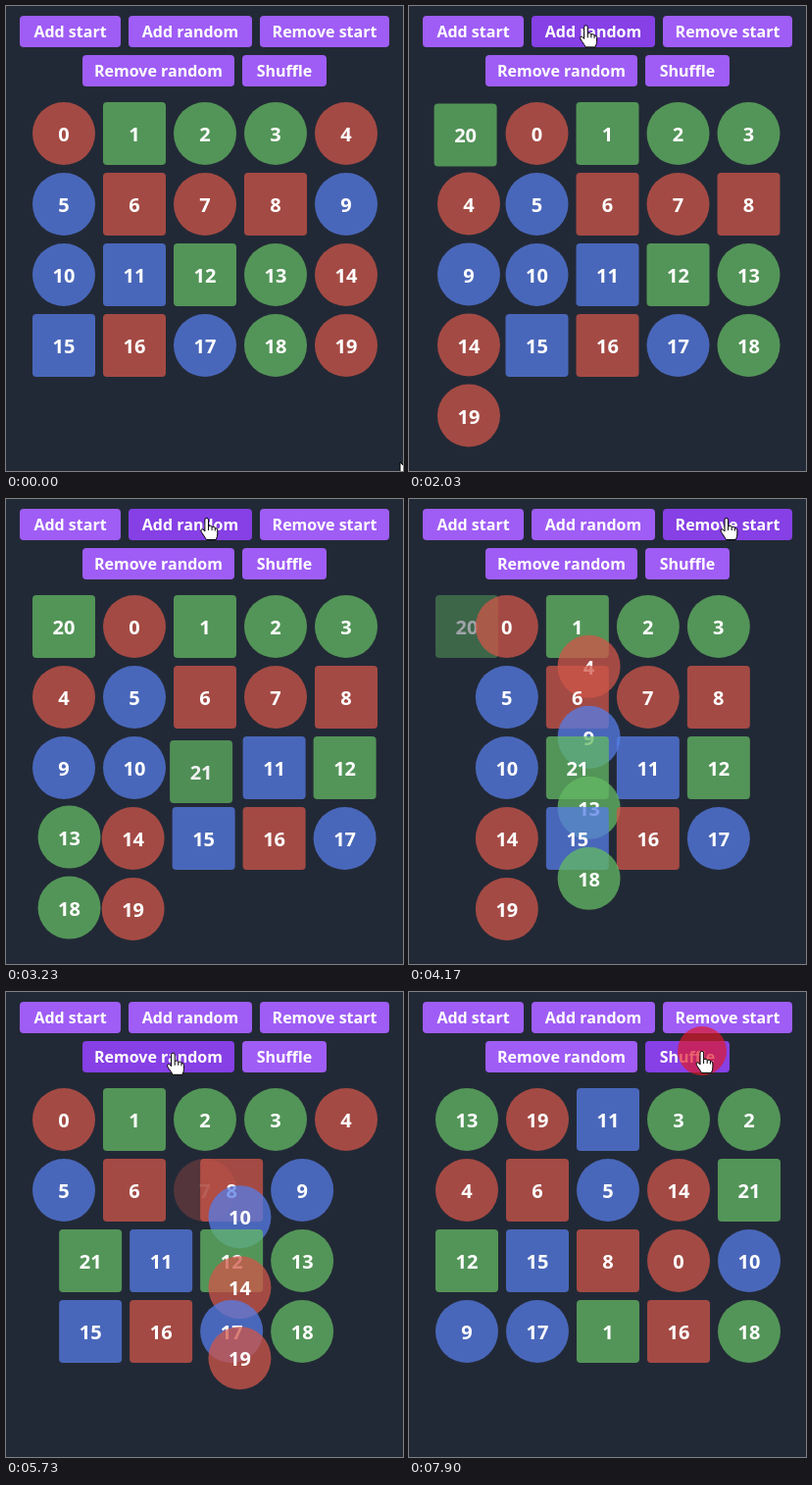
An HTML page that plays this animation: 405x474 px, repeating every 8000 ms.

```html
<!DOCTYPE html>
<html lang="en">
<head>
<meta charset="utf-8">
<title>List transitions</title>
<style>
  html, body { margin: 0; width: 100%; height: 100%; overflow: hidden; background: #222936; }
  body { position: relative; color: #fff; font: 600 16px "Noto Sans", "Open Sans", sans-serif; cursor: none; }
  .button, .item, #ripple, #cursor { position: absolute; left: 0; top: 0; }
  .button, .item { display: flex; align-items: center; justify-content: center; border-radius: 4px; white-space: nowrap; }
  .button { height: 32px; background: #9f5df5; }
  .button.hover { background: #8640e5; }
  #list { position: absolute; inset: 0; isolation: isolate; }
  .item { width: 64px; height: 64px; font-size: 20px; }
  .circle { border-radius: 50%; }
  .r { background: rgba(207, 86, 72, .75); }
  .g { background: rgba(99, 186, 99, .75); }
  .b { background: rgba(86, 125, 230, .75); }
  #ripple { width: 50px; height: 50px; border-radius: 50%; background: rgba(225, 25, 40, .68); }
  #cursor { overflow: visible; fill: #fff; stroke: #000; stroke-width: 1; stroke-linejoin: round; }
</style>
</head>
<body>
<div id="list"></div>
<div id="ripple"></div>
<svg id="cursor" width="1" height="1">
  <path id="arrow" d="M0 0V16L4 12.5L6.5 18.5L9 17.4L6.5 11.6H11.5Z"/>
  <g id="hand">
    <path d="M-2 14V2.2a1.8 1.8 0 0 1 3.6 0V8.5q3-1 3.6.9q2.6-.6 3.2 1q2.5 0 2.5 2.6V17q0 2-1.5 5.5H-.5q-1-2-3.5-5.5q-2-2.5-2-4t2-1.2z"/>
    <path d="M1.6 8.5V13M5.2 9.4V13M8.4 10.4V13.5" fill="none"/>
  </g>
</svg>
<script>
const LOOP = 8000, DURATION = 1000, CLICK_LENGTH = 140, ENTER_SHIFT = 60;
const $ = id => document.getElementById(id);

function bezier(x1, y1, x2, y2) {
  const curve = (a, b, s) => 3 * (1 - s) ** 2 * s * a + 3 * (1 - s) * s * s * b + s ** 3;
  return x => {
    if (x <= 0 || x >= 1) return x <= 0 ? 0 : 1;
    let low = 0, high = 1;
    for (let i = 0; i < 24; i++) {
      const mid = (low + high) / 2;
      if (curve(x1, x2, mid) < x) low = mid; else high = mid;
    }
    return curve(y1, y2, low);
  };
}
const ease = bezier(.25, .1, .25, 1);
const easeInOut = bezier(.42, 0, .58, 1);
const smooth = p => p * p * (3 - 2 * p);
const mix = (a, b, p) => a + (b - a) * p;
const clamp = p => Math.min(1, Math.max(0, p));

function add(parent, className, text) {
  const el = document.createElement('div');
  el.className = className;
  el.textContent = text;
  parent.append(el);
  return el;
}

const buttons = [
  ['Add start', 14, 10, 103], ['Add random', 125, 10, 126], ['Remove start', 259, 10, 132],
  ['Remove random', 78, 50, 155], ['Shuffle', 241, 50, 86],
].map(([text, x, y, w]) => {
  const el = add(document.body, 'button', text);
  el.style.cssText = `left:${x}px;top:${y}px;width:${w}px`;
  return { el, contains: (px, py) => px >= x && px < x + w && py >= y && py < y + 32 };
});
document.body.append($('list'), $('ripple'), $('cursor'));

// Colour of each item; upper case marks a circle.
const items = [...'RgGGRBrRrBBbgGRbrBGRgg'].map((kind, n) => {
  const colour = kind.toLowerCase();
  return add($('list'), `item ${colour} ${kind === colour ? '' : 'circle'}`, n);
});

const initial = Array.from({ length: 20 }, (_, n) => n);
const prepended = [20, ...initial];
const inserted = prepended.toSpliced(12, 0, 21);
const shifted = inserted.slice(1);
const reduced = shifted.filter(n => n !== 7);
const shuffled = [13, 19, 11, 3, 2, 4, 6, 5, 14, 21, 12, 15, 8, 0, 10, 9, 17, 1, 16, 18];
const orders = [initial, prepended, inserted, shifted, reduced, shuffled];

const clicks = [1000, 2270, 3770, 5230, 6530, 7900];
// Pointer moves: start time, end time, destination.
const moves = [
  [0, 30, 402, 465], [30, 830, 66, 23], [1700, 2110, 193, 19],
  [3140, 3630, 324, 19], [4600, 4970, 156, 62], [5640, 6100, 299, 60],
];

function pointerAt(t) {
  let [, , x, y] = moves[0];
  for (const [start, end, toX, toY] of moves) {
    const p = smooth(clamp((t - start) / (end - start)));
    x = mix(x, toX, p);
    y = mix(y, toY, p);
  }
  return [x, y];
}

const cell = index => [27 + index % 5 * 72, 98 + Math.floor(index / 5) * 72];

function drawItems(t) {
  const step = clicks.filter(c => t >= c + CLICK_LENGTH).length;
  const now = orders[step], before = orders[Math.max(0, step - 1)];
  const progress = step ? clamp((t - clicks[step - 1] - CLICK_LENGTH) / DURATION) : 1;
  const moved = ease(progress), entered = easeInOut(progress);

  items.forEach((el, n) => {
    const to = now.indexOf(n), from = before.indexOf(n);
    let x = 0, y = 0, opacity = 1;
    if (to >= 0 && from >= 0) {
      const a = cell(from), b = cell(to);
      x = mix(a[0], b[0], moved);
      y = mix(a[1], b[1], moved);
    } else if (to >= 0) {
      [x, y] = cell(to);
      x -= ENTER_SHIFT * (1 - entered);
      y += ENTER_SHIFT * (1 - entered);
      opacity = entered;
    } else if (from >= 0) {
      [x, y] = cell(from);
      opacity = 1 - moved;
    } else {
      opacity = 0;
    }
    el.style.transform = `translate(${x}px, ${y}px)`;
    el.style.opacity = opacity;
    el.style.zIndex = to >= 0 ? 2 * to + 1 : Math.max(0, 2 * from);
  });
}

function drawPointer(t) {
  const [x, y] = pointerAt(t);
  let over = false;
  for (const { el, contains } of buttons) {
    const hit = contains(x, y);
    el.classList.toggle('hover', hit);
    over ||= hit;
  }
  $('cursor').style.transform = `translate(${x}px, ${y}px)`;
  $('hand').style.display = over ? '' : 'none';
  $('arrow').style.display = over ? 'none' : '';
  const clicking = clicks.some(c => t >= c && t < c + CLICK_LENGTH);
  $('ripple').style.display = clicking ? '' : 'none';
  $('ripple').style.transform = `translate(${x - 25}px, ${y - 25}px)`;
}

const origin = performance.now();
function frame() {
  const t = (performance.now() - origin) % LOOP;
  drawItems(t);
  drawPointer(t);
  requestAnimationFrame(frame);
}
frame();
</script>
</body>
</html>
```
